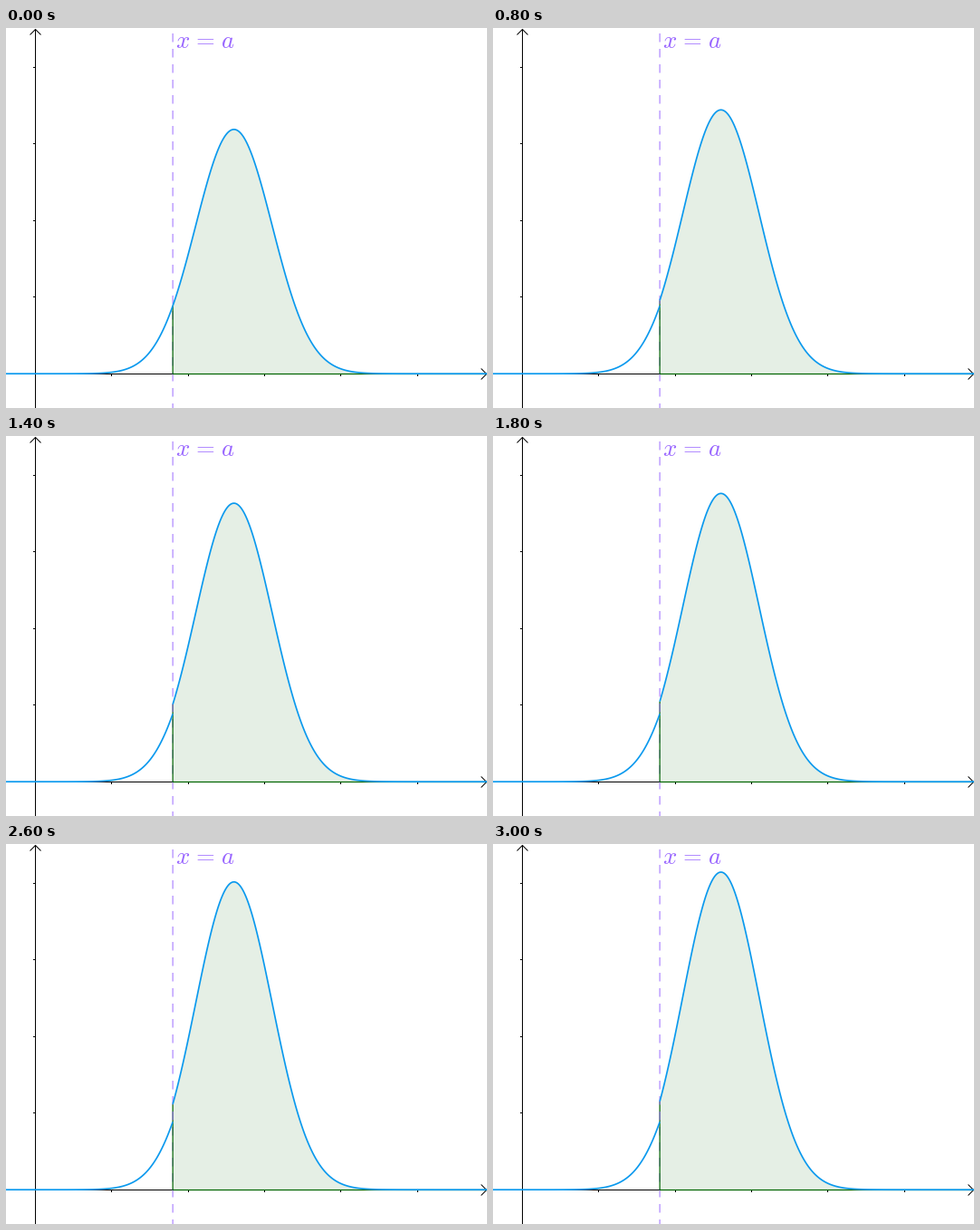
Write a matplotlib script that moves like this. It is 531x419 px and loops after 3.2 s.

```python
import numpy as np
import matplotlib.pyplot as plt
from matplotlib.animation import FuncAnimation

W, H, DPI = 531, 419, 64
PT = 72 / DPI                      # points per pixel
FRAMES, INTERVAL = 16, 200

OX, OY, UNIT = 32.2, 381.2, 84.4   # origin and unit length in pixels
MEAN, SIGMA, CUT, AREA = 2.6, 0.5, 1.8, 4.0
GROWTH = 0.02                      # height gained per step

BLUE, GREEN, PURPLE = "#0a99ee", "#006400", "#9966ff"

plt.rcParams["mathtext.fontset"] = "cm"
plt.rcParams["path.simplify"] = False
fig = plt.figure(figsize=(W / DPI, H / DPI), dpi=DPI, facecolor="white")
ax = fig.add_axes([0, 0, 1, 1])
ax.set_xlim(0, W)
ax.set_ylim(H, 0)
ax.axis("off")


def line(xs, ys, color="black", width=1.0, **kw):
    return ax.plot(xs, ys, color=color, lw=width * PT, snap=False,
                   solid_capstyle="butt", **kw)[0]


def bell(x):
    z = (x - MEAN) / SIGMA
    return AREA * np.exp(-z * z / 2) / (SIGMA * np.sqrt(2 * np.pi))


def to_px(x, y):
    return OX + UNIT * x, OY - UNIT * y


def crisp(v):
    return np.floor(v) + 0.5


x_left = np.linspace(-OX / UNIT, CUT, 300)
x_right = np.linspace(CUT, (W - OX) / UNIT, 500)
cut_px, cut_top = to_px(CUT, bell(CUT))
ax_x, ax_y = crisp(OX), crisp(OY)

# Axes with ticks and open arrowheads
line([0, W], [ax_y, ax_y], zorder=1)
line([ax_x, ax_x], [H, 1.5], zorder=1)
line([ax_x - 6, ax_x, ax_x + 6], [7.5, 1.5, 7.5], zorder=1)
line([524.5, 530.5, 524.5], [ax_y - 6, ax_y, ax_y + 6], zorder=1)
for k in range(1, 6):
    x, y = crisp(np.array(to_px(k, k)))
    line([x, x], [381, 384], zorder=1)
    if k < 5:
        line([30, 33], [y, y], zorder=1)

# Shaded region, its edges and the curve
area = ax.fill([0], [0], color=GREEN, alpha=0.1, lw=0, zorder=2)[0]
edge = line([], [], GREEN, 1.2, zorder=3)
line([cut_px, cut_px, W], [cut_top, ax_y, ax_y], GREEN, 1.2, zorder=5)
line(*to_px(x_left, bell(x_left)), BLUE, 1.7, zorder=6)
right = line([], [], BLUE, 1.7, zorder=6)

# Dashed boundary and its label
for top in range(6, H, 17):
    line([cut_px] * 2, [top, top + 9.5], PURPLE, 1.2, alpha=0.8, zorder=4)
ax.text(187.4, 21.6, r"$x\hspace{0.12}=\hspace{0.12}a$", color=PURPLE,
        fontsize=26.7 * PT, ha="left", va="baseline", zorder=7)


def update(i):
    px, py = to_px(x_right, (1 + GROWTH * i) * bell(x_right))
    right.set_data(px, py)
    edge.set_data([cut_px] * 2, [cut_top, py[0]])
    area.set_xy(np.column_stack([np.r_[px, W, cut_px], np.r_[py, OY, OY]]))
    return area, edge, right


anim = FuncAnimation(fig, update, frames=FRAMES, interval=INTERVAL,
                     init_func=lambda: update(0), repeat=True, repeat_delay=0)
plt.show()
```
